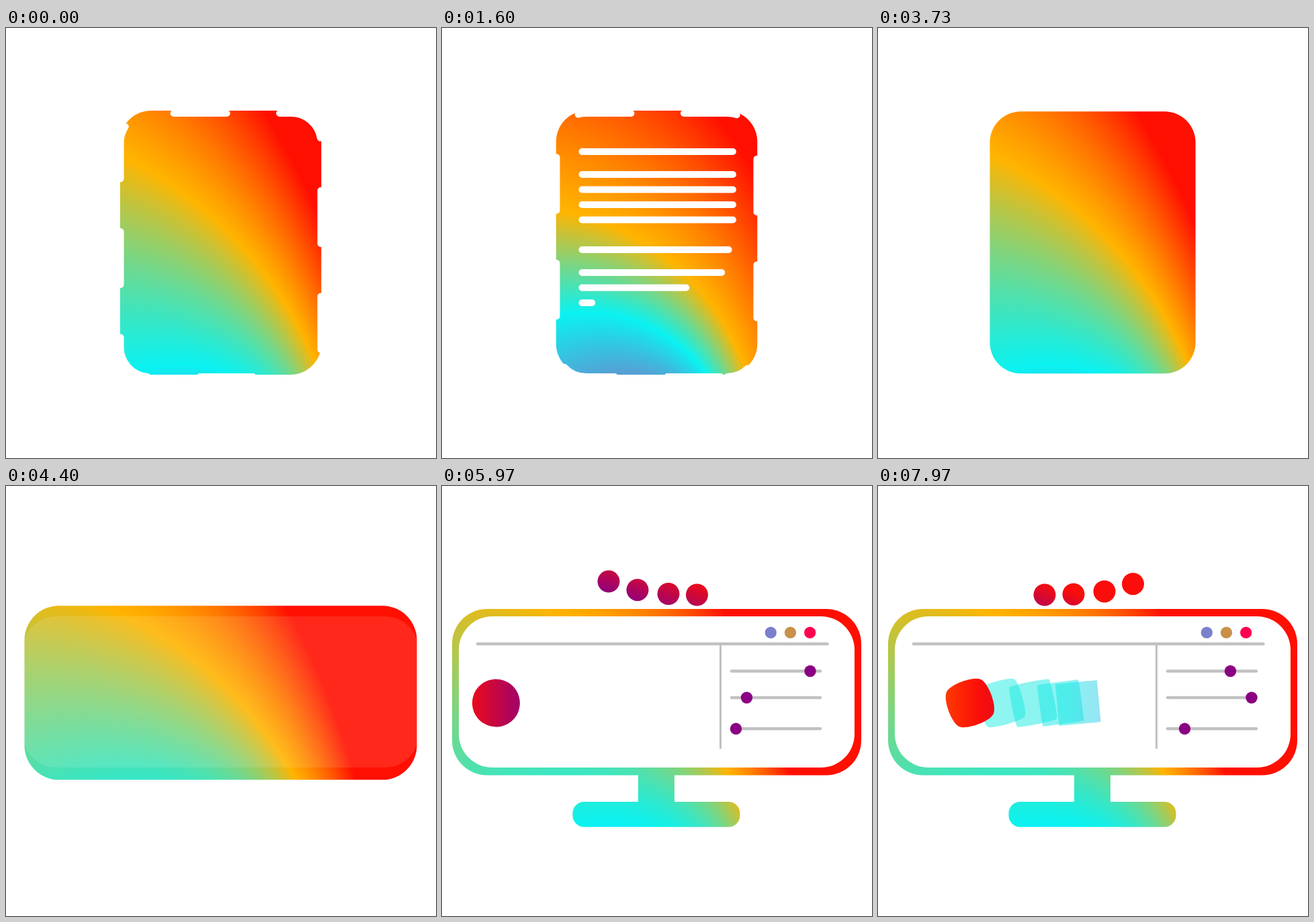
Animation of 640x640 px, one loop 8000 ms. Source, as an HTML page with a canvas:

```html
<!DOCTYPE html>
<html>
<head>
<meta charset="utf-8">
<style>
  html, body { margin: 0; width: 100%; height: 100%; overflow: hidden; background: #fff; }
  canvas { display: block; width: 100%; height: 100%; }
</style>
</head>
<body>
<canvas id="stage" width="640" height="640"></canvas>
<script>
const ctx = document.getElementById('stage').getContext('2d');
const LOOP = 8000;
const WHITE = '#fff', GRAY = '#c1c1c1', PURPLE = '#8a0082', RED = '#fa0d0a';

const clamp = v => Math.min(1, Math.max(0, v));
const lerp = (a, b, p) => a + (b - a) * p;
const span = (t, start, length) => clamp((t - start) / length);

// Cubic bezier easing with handles (x1, 0) and (x2, 1)
const curve = (x1, x2) => x => {
  let lo = 0, hi = 1;
  for (let i = 0; i < 20; i++) {
    const u = (lo + hi) / 2, v = 1 - u;
    if (3 * v * v * u * x1 + 3 * v * u * u * x2 + u * u * u < x) lo = u; else hi = u;
  }
  return lo * lo * (3 - 2 * lo);
};
const settle = curve(.33, .1), swing = curve(.6, .4), smooth = curve(1 / 3, 2 / 3);

// keys: [time, value...] rows
function track(keys, t, ease) {
  let i = 0;
  while (i < keys.length - 2 && t >= keys[i + 1][0]) i++;
  const [a, b] = [keys[i], keys[i + 1]];
  const p = ease(span(t, a[0], b[0] - a[0]));
  return a.slice(1).map((v, k) => lerp(v, b[k + 1], p));
}

function box(x, y, w, h, r, fill) {
  ctx.beginPath();
  ctx.roundRect(x, y, w, h, r);
  ctx.fillStyle = fill;
  ctx.fill();
}

function disc(x, y, r, fill) {
  if (r <= 0) return;
  ctx.beginPath();
  ctx.arc(x, y, r, 0, 7);
  ctx.fillStyle = fill;
  ctx.fill();
}

function line(x1, y1, x2, y2, width, color, cap = 'round') {
  ctx.beginPath();
  ctx.moveTo(x1, y1);
  ctx.lineTo(x2, y2);
  ctx.lineWidth = width;
  ctx.lineCap = cap;
  ctx.strokeStyle = color;
  ctx.stroke();
}

function addStops(gradient, stops) {
  for (const [at, color] of stops) gradient.addColorStop(at, color);
  return gradient;
}

// Rainbow: focus x, y; circle x, y, radius; cyan and amber stops
const RAINBOW = [
  [0, 445, 704, -595, 736, 1155, .18, .51],
  [770, 100, 620, 0, 640, 640, 0, 0],
  [2070, 491, 700, -193, 532, 720, .444, .718],
  [3400, 445, 704, -595, 736, 1155, .18, .51]
];
function rainbow(t) {
  const [fx, fy, cx, cy, r, cyan, amber] = track(RAINBOW, t, smooth);
  return addStops(ctx.createRadialGradient(fx, fy, 0, cx, cy, r),
    [[0, '#e10aa0'], [cyan, '#0af2f2'], [amber, '#ffb400'], [1, '#ff0f00']]);
}

const ROWS = [184, 218, 240.5, 263, 285.5, 330, 364, 386.5, 409, 431.5, 465];
const ROW_DELAYS = [0, 100, 305, 512, 718];

function drawRows(t) {
  ROWS.forEach((y, i) => {
    const start = Math.floor(i / 5) * 993 + ROW_DELAYS[i % 5];
    const shown = settle(span(t, start, 800)) * (1 - settle(span(t, 2750 + i * 20, 450)));
    if (shown > .005) line(208.5, y, 208.5 + 224.5 * shown, y, 10, WHITE);
  });
}

function drawDashes(t) {
  const width = 10 * (1 - span(t, 3400, 250));
  if (!width) return;
  const l = 170.5, r = 468.5, top = 127, b = 519, c = 44;
  ctx.beginPath();
  ctx.moveTo(r - c, b);
  ctx.arcTo(l, b, l, top, c);
  ctx.arcTo(l, top, r, top, c);
  ctx.arcTo(r, top, r, b, c);
  ctx.arcTo(r, b, l, b, c);
  ctx.setLineDash([79, 78.5]);
  ctx.lineDashOffset = -(57 + track([[0, 0], [770, 44], [2070, 148], [3700, 278]], t, p => p)[0]);
  ctx.lineWidth = width;
  ctx.lineCap = 'round';
  ctx.strokeStyle = WHITE;
  ctx.stroke();
  ctx.setLineDash([]);
}

function drawStand(t, paint) {
  const p = settle(span(t, 4750, 800));
  if (!p) return;
  const dy = -77 * (1 - p);
  box(292, 425 + dy, 54, 50, 4, paint);
  box(194.5, 470 + dy, 249, 37.5, 17, paint);
}

function drawBalls(t) {
  if (t < 4330) return;
  const a = lerp(.12, .82, span(t, 5970, 2000));
  const gx = 22.7, gy = -65.7, x0 = 248 - a * gx, y0 = 155 - a * gy;
  const paint = addStops(ctx.createLinearGradient(x0, y0, x0 + gx, y0 + gy),
    [[0, PURPLE], [1, RED]]);
  [248, 291, 337, 379.5].forEach((x, i) => {
    const local = t - i * 230;
    const rise = settle(span(local, 4330, 800));
    const up = swing(span(local, 5255, 1290)) - swing(span(local, 6645, 1290));
    disc(x, 201 - 39 * rise - 31.5 * up, 16.5, paint);
  });
}

// Square at home = 0, circle at home = 1
function blob(home, scale, fill) {
  const x = lerp(303, 80.5, home), square = 1 - home ** 1.5;
  const r = lerp(35.5, 44, square) * scale, h = lerp(19.6, 0, square) * scale;
  const turn = -(5 + 20 * home) * Math.PI / 180;
  const at = (k, side) => {
    const angle = turn + Math.PI / 4 + k * Math.PI / 2, c = Math.cos(angle), s = Math.sin(angle);
    return [x + r * c - side * h * s, 323 + r * s + side * h * c];
  };
  ctx.beginPath();
  ctx.moveTo(...at(0, 0));
  for (let k = 0; k < 4; k++) ctx.bezierCurveTo(...at(k, 1), ...at(k + 1, -1), ...at(k + 1, 0));
  ctx.fillStyle = fill(x);
  ctx.fill();
}

function drawBlob(t) {
  if (t < 5250) return;
  const back = time => smooth(span(time, 7204, 1143));
  if (t > 7204) {
    const ghost = addStops(ctx.createLinearGradient(160, 0, 340, 0),
      [[0, 'rgba(20,235,222,.47)'], [.7, 'rgba(20,230,228,.5)'], [1, 'rgba(70,200,235,.55)']]);
    for (let i = 4; i > 0; i--) blob(back(t - i * 166), 1, () => ghost);
  }
  const home = t > 7204 ? back(t) : 1 - smooth(span(t, 6000, 1143));
  const scale = track([[5250, 0], [5500, 1.42], [5800, 1]], t, smooth)[0];
  const [from, to] = track([[5970, -88, 57], [7970, -45, 195]], t, p => p);
  blob(home, scale, x => addStops(ctx.createLinearGradient(x + from, 0, x + to, 0),
    [[0, '#ff4000'], [.25, RED], [1, PURPLE]]));
}

const SLIDERS = [
  [275.5, [[5970, 548], [7970, 524.5]]],
  [315, [[5970, 453.5], [6730, 555], [7200, 557], [7970, 556]]],
  [361.3, [[5970, 437.5], [7970, 456.5]]]
];

function drawPanel(t) {
  if (t < 4780) return;
  const drawn = settle(span(t, 4780, 800));
  line(573.5, 235, lerp(573.5, 53, drawn), 235, 4.5, GRAY);
  const down = settle(span(t, 5000, 700));
  if (down) line(414.5, 236, 414.5, 236 + 155 * down, 3, GRAY, 'butt');
  SLIDERS.forEach(([y, keys], i) => {
    line(563, y, lerp(563, 431, drawn), y, 4.5, GRAY);
    disc(track(keys, t, smooth)[0], y, 8.7 * settle(span(t, 5250 + i * 80, 500)), PURPLE);
  });
  ['#7a80cc', '#c8904a', '#ff0050'].forEach((color, i) =>
    disc(489.3 + i * 29.2, 218.2, 8.6 * settle(span(t, 5200 + i * 80, 500)), color));
}

function draw(t) {
  ctx.fillStyle = WHITE;
  ctx.fillRect(0, 0, 640, 640);
  const paint = rainbow(t);
  const grow = settle(span(t, 3640, 1220));

  drawStand(t, paint);
  drawBalls(t);
  box(lerp(169.8, 15, grow), lerp(123, 183, grow), lerp(299.5, 609, grow),
    lerp(393, 247.5, grow), lerp(46, 52, grow), paint);

  if (t < 3650) {
    drawDashes(t);
    drawRows(t);
  }
  const cover = span(t, 4350, 486);
  if (cover) box(25, 194, 589, 225, 50, `rgba(255,255,255,${cover})`);
  drawBlob(t);
  drawPanel(t);
}

const begin = performance.now();
function frame() {
  draw((performance.now() - begin) % LOOP);
  requestAnimationFrame(frame);
}
frame();
</script>
</body>
</html>
```
